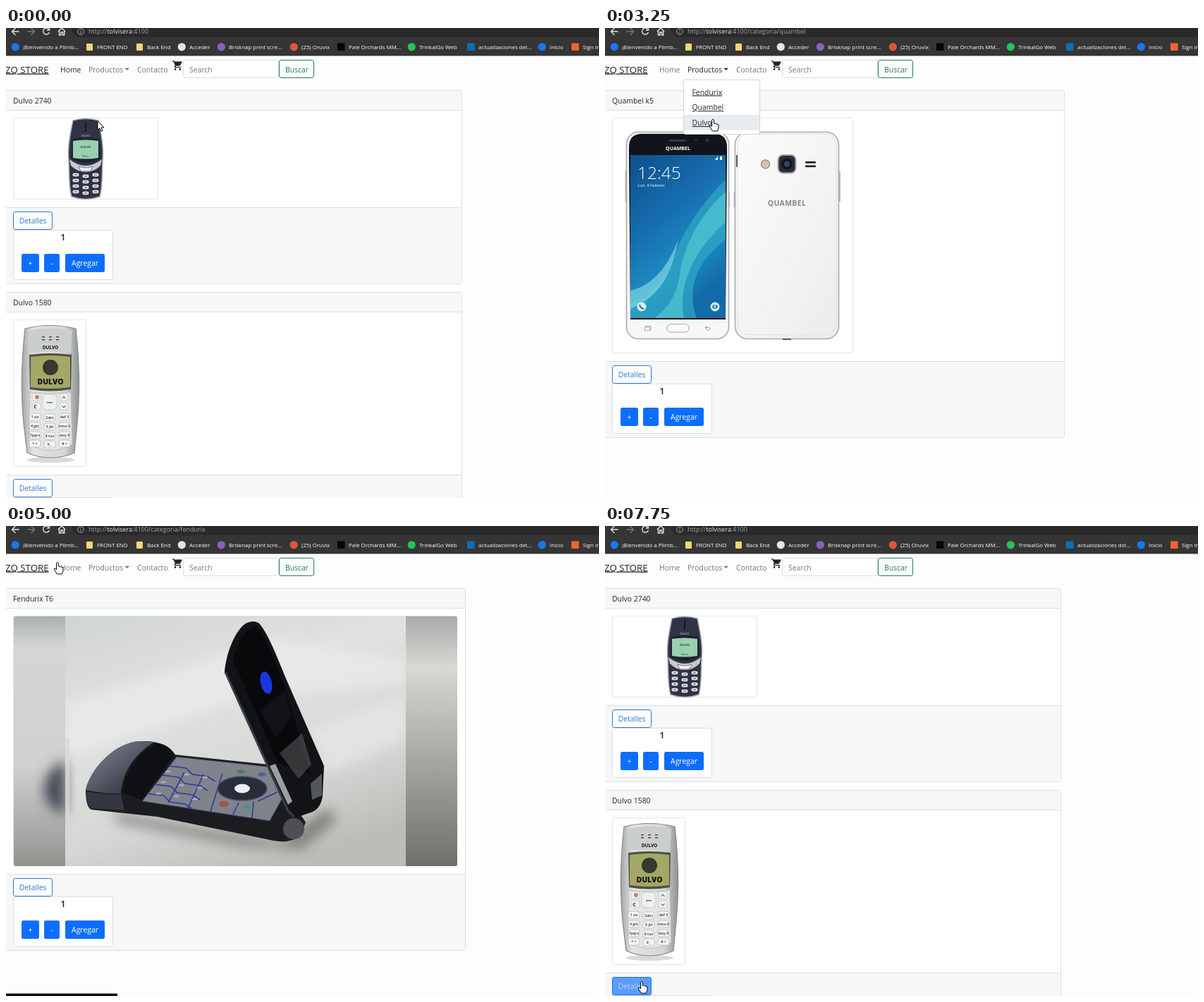
An HTML page that plays this animation: 841x666 px, repeating every 8000 ms.

```html
<!DOCTYPE html>
<html lang="es">
<head>
<meta charset="utf-8">
<title>Tienda</title>
<style>
  html, body { margin: 0; width: 100%; height: 100%; overflow: hidden; background: #fdfdfd; }
  svg { display: block; width: 841px; height: 666px; font-family: "Open Sans", "Noto Sans", sans-serif; }
  text { white-space: pre; }
</style>
</head>
<body>
<svg id="stage" viewBox="0 0 841 666">
  <defs>
    <linearGradient id="wallpaper" x1="0" y1="0" x2=".5" y2="1">
      <stop offset="0" stop-color="#0f4f8c"/><stop offset=".45" stop-color="#176fb0"/>
      <stop offset=".75" stop-color="#1d8dc0"/><stop offset="1" stop-color="#126aa8"/>
    </linearGradient>
    <linearGradient id="silver">
      <stop offset="0" stop-color="#a3a6a6"/><stop offset=".2" stop-color="#e2e4e3"/>
      <stop offset=".75" stop-color="#d5d7d6"/><stop offset="1" stop-color="#8f9292"/>
    </linearGradient>
    <linearGradient id="backCover" x1="0" y1="0" x2="1" y2="1">
      <stop offset="0" stop-color="#fcfcfc"/><stop offset="1" stop-color="#ececee"/>
    </linearGradient>
    <linearGradient id="table" x1="0" y1="0" x2=".6" y2="1">
      <stop offset="0" stop-color="#cdd2d0"/><stop offset=".4" stop-color="#e0e2e0"/>
      <stop offset=".75" stop-color="#d6d7d4"/><stop offset="1" stop-color="#bcbcb8"/>
    </linearGradient>
    <linearGradient id="leftBlur" x1="0" y1="0" x2="0" y2="1">
      <stop offset="0" stop-color="#a9afad"/><stop offset=".12" stop-color="#d3d6d4"/>
      <stop offset=".6" stop-color="#cfd1cf"/><stop offset="1" stop-color="#92938f"/>
    </linearGradient>
    <linearGradient id="rightBlur" x1="0" y1="0" x2="0" y2="1">
      <stop offset="0" stop-color="#a9aba8"/><stop offset=".2" stop-color="#d8d8d4"/>
      <stop offset=".55" stop-color="#aaaaa5"/><stop offset="1" stop-color="#6f6f6b"/>
    </linearGradient>
    <linearGradient id="chin" x1="0" y1="0" x2="1" y2="1">
      <stop offset="0" stop-color="#868a96"/><stop offset=".5" stop-color="#555966"/><stop offset="1" stop-color="#202129"/>
    </linearGradient>
    <filter id="blur" x="-50%" y="-50%" width="200%" height="200%"><feGaussianBlur stdDeviation="9"/></filter>
    <clipPath id="photo"><rect x="11" y="128" width="629" height="354" rx="3"/></clipPath>
    <clipPath id="screen"><rect x="36" y="180" width="135" height="231"/></clipPath>
  </defs>
</svg>
<script>
const INK = '#212529', GRAY = '#757575', BLUE = '#0d6efd', SOFT_BLUE = '#2f78d6', LINE = '#dcdee0';
const HOST = 'tolvisera';
const BRANDS = ['Fendurix', 'Quambel', 'Dulvo'];

const text = (x, y, str, fill = INK, size = 10.4, extra = '') =>
  `<text x="${x}" y="${y}" fill="${fill}" font-size="${size}" ${extra}>${str}</text>`;
const rect = (x, y, w, h, fill, extra = '') =>
  `<rect x="${x}" y="${y}" width="${w}" height="${h}" fill="${fill}" ${extra}/>`;
const frame = (x, y, w, h, fill, stroke) => rect(x, y, w, h, fill, `rx="2.7" stroke="${stroke}"`);
const path = (d, fill = 'none', extra = '') => `<path d="${d}" fill="${fill}" ${extra}/>`;
const oval = (x, y, rx, ry, fill, extra = '') =>
  `<ellipse cx="${x}" cy="${y}" rx="${rx}" ry="${ry}" fill="${fill}" ${extra}/>`;
const disc = (x, y, r, fill, extra) => oval(x, y, r, r, fill, extra);
const centered = 'text-anchor="middle"';
const group = (id, body) => `<g id="${id}">${body}</g>`;
const grid = (xs, ys, draw) => ys.map((y, r) => xs.map((x, c) => draw(x, y, r, c)).join('')).join('');

function button(x, y, w, label) {
  return rect(x, y, w, 26, BLUE, 'rx="2.7"') + text(x + w / 2, y + 16.7, label, '#fff', 10.4, centered);
}

function details(y, fill, stroke, color) {
  return frame(10.5, y, 55, 25, fill, stroke) + text(18.7, y + 16.8, 'Detalles', color);
}

function card(y, title, width, photoW, photoH, photo) {
  const foot = y + photoH + 51;
  return frame(-4.5, y, width + 5, photoH + 159, '#fff', LINE) +
    rect(-4, y + .5, width + 4, 28, '#f7f7f7') + rect(-4, foot, width + 4, 107.5, '#f7f7f7') +
    path(`M0 ${y + 28}H${width}M0 ${foot}H${width}`, 'none', `stroke="${LINE}"`) +
    text(10, y + 18.3, title) +
    frame(10.5, y + 39, photoW, photoH, '#fff', '#e1e4e7') + photo +
    details(foot + 6, '#fdfdfd', SOFT_BLUE, SOFT_BLUE) +
    frame(10.5, foot + 32, 141, 70, '#fff', LINE) +
    text(81, foot + 46, 1, INK, 13, centered + ' font-weight="600"') +
    button(22, foot + 65.5, 25, '+') + button(54, foot + 65.5, 22, '-') + button(84, foot + 65.5, 56, 'Agregar');
}

function darkPhone() {
  return path('M95 131Q113 126 131 131C135 150 139 170 137 188C136 208 137 226 133 239Q113 246 93 239C89 226 90 208 89 188C87 170 91 150 95 131Z',
      '#303344', 'stroke="#a9abb5" stroke-width="1.5"') +
    path('M113 133V147', 'none', 'stroke="#171923" stroke-width="2"') +
    text(113, 154, 'DULVO', '#d5d7df', 3.8, centered) +
    path('M94 157Q113 153 132 157L134 185Q113 197 92 185Z', '#1f2230') +
    path('M95 160Q113 157 131 160V184Q113 187 95 184Z', '#98d0b0') +
    text(113, 170, 'DULVO', '#294b3b', 4.2, centered + ' font-weight="700"') +
    text(113, 183, 'Menu', '#294b3b', 3.6, centered) +
    path('M90 186Q113 204 136 186L134 195Q125 204 113 204Q101 204 92 195Z', '#c6c9d0') +
    path('M103 196Q113 200 123 196L120 203H106Z', '#f0f1f4', 'stroke="#555867" stroke-width=".7"') +
    grid([99, 113, 127], [208, 216, 224, 232], (x, y, r, c) => {
      const ky = y + (c === 1 ? 2 : 0);
      return oval(x, ky, 5, 2.9, '#dfe1e7', 'stroke="#111420" stroke-width=".6"') + rect(x - 2, ky - .6, 4, 1.2, '#666a78');
    });
}

function silverPhone() {
  const keys = ['1 oo', '2abc', 'def 3', '4 ghi', '5 jkl', 'mno 6', '7pqrs', '8 tuv', 'wxy 9', '* +', '0 _', '# ^'];
  return oval(63, 612, 34, 4, '#d8d9d8') +
    path('M27 426Q63 417 99 426C104 470 105 520 101 560L97 602Q63 616 30 602L25 560C21 520 22 470 27 426Z',
      'url(#silver)', 'stroke="#858988" stroke-width="1.2"') +
    path('M32 429Q63 422 94 429L92 461Q63 456 34 461Z', '#cbcecf') +
    grid([53, 63, 73], [437, 441], (x, y) => rect(x - 2, y, 4, 1.4, '#444')) +
    text(63, 455, 'DULVO', '#111', 6.5, centered + ' font-weight="700"') +
    path('M33 463Q63 459 93 463L92 512Q63 517 34 512Z', '#4f523f') +
    path('M35 466Q63 462 91 466V509Q63 513 35 509Z', '#a3a768') +
    disc(63, 481, 11, '#36392b') +
    text(63, 505, 'DULVO', '#15170e', 10.5, centered + ' font-weight="800"') +
    path('M34 516Q63 520 92 516L94 590Q63 607 32 590Z', '#e4e6e4', 'stroke="#aeb1af" stroke-width=".7"') +
    grid([43, 82], [523, 536], (x, y) => rect(x - 6, y - 5, 12, 10, '#f2f3f1', 'rx="3" stroke="#b5b8b6" stroke-width=".6"')) +
    disc(44, 523, 3, '#c4846a') + text(41.5, 539, 'C', '#222', 7, centered + ' font-weight="700"') +
    path('M79.5 525L82 522L84.5 525M79.5 535L82 538L84.5 535', 'none', 'stroke="#333"') +
    rect(52, 519, 20, 22, '#eff0ee', 'rx="6" stroke="#b9bcba" stroke-width=".7"') +
    rect(58, 530, 8, 1.6, '#557fb0') +
    grid([41, 62, 83], [551, 564, 577, 589], (x, y, r, c) => {
      const ky = y + (c === 1 ? 1 : 0);
      return rect(x - 8, ky - 5, 16, 10, '#f4f5f3', 'rx="3" stroke="#b2b5b3" stroke-width=".7"') +
        text(x, ky + 2.3, keys[r * 3 + c], '#333', 5.3, centered + ' font-weight="600"');
    });
}

function whitePhone() {
  const edge = 'stroke="#a7a9ae" stroke-width="1.6"';
  return rect(28.5, 202, 3, 45, '#b9bcc0') + rect(174, 232, 3, 22, '#b9bcc0') + rect(182.5, 232, 3, 22, '#b9bcc0') + rect(331, 203, 3, 43, '#b9bcc0') +
    rect(30.5, 147.5, 145, 293, '#f7f7f8', `rx="17" ${edge}`) +
    path('M34 181V169Q34 150 52 150H155Q173 150 173 169V181L171 413H36Z', '#11151b') +
    rect(36, 180, 135, 231, 'url(#wallpaper)') +
    `<g clip-path="url(#screen)">` +
    path('M171 215C135 250 110 290 95 330C80 365 60 385 36 390V411H130C115 370 130 330 171 300Z', '#2fa9c6', 'opacity=".7"') +
    path('M171 232C130 270 112 310 106 350C100 385 85 400 70 411H112C104 370 120 320 171 275Z', '#62d2d8', 'opacity=".55"') +
    path('M36 372C70 365 90 335 104 300C95 345 80 380 36 398Z', '#8fe3e6', 'opacity=".6"') + '</g>' +
    rect(90, 158, 25, 3, '#343a42', 'rx="1.5"') + disc(145, 159, 2.5, '#2b3440') + disc(129, 159, 1.5, '#303842') +
    text(103.5, 173, 'QUAMBEL', '#fff', 7, centered + ' font-weight="700"') +
    path('M156 187L160 182V187Z', '#fff') + rect(163, 182, 3, 5, '#fff') +
    text(46, 214, '12:45', '#fff', 24.5, 'font-weight="300"') + text(47, 225, 'Lun. 8 Febrero', '#fff', 5.6) +
    disc(52, 395, 6.5, '#d7f0f4') + path('M49 392Q50 397 55 398', 'none', 'stroke="#28779a" stroke-width="2"') +
    disc(156, 395, 6.5, '#d7f0f4') + rect(152.5, 392.5, 7, 5, '#28779a', 'rx="1"') + disc(156, 395, 1.4, '#d7f0f4') +
    rect(88, 419.5, 31, 11.5, '#fafafa', 'rx="5.5" stroke="#a3a5a8"') +
    rect(58, 422.5, 7, 5, 'none', 'stroke="#999" stroke-width=".8"') + rect(56.5, 424, 7, 5, '#f7f7f8', 'stroke="#999" stroke-width=".8"') +
    path('M145 422.5L142 424.5L145 426.5M142 424.5H148Q151 426 148 428H144', 'none', 'stroke="#999" stroke-width=".9"') +
    rect(184.5, 147.5, 147, 293, 'url(#backCover)', `rx="18" ${edge}`) +
    rect(188, 150.5, 140, 284, 'none', 'rx="15" stroke="#e0e1e3"') +
    path('M187 180V197M252 441H264', 'none', 'stroke="#565a60" stroke-width="2"') +
    disc(227.5, 193, 6, '#d7c59d', 'stroke="#939498" stroke-width="1.5"') +
    rect(245.5, 180, 25, 25.5, '#282d36', 'rx="7" stroke="#a4a7ac" stroke-width="2"') +
    disc(258, 192.7, 8, '#11161f') + disc(258, 192.7, 4, '#34466a') +
    rect(284, 189, 15, 2.8, '#22252a', 'rx="1"') + rect(284, 194.5, 15, 2.8, '#22252a', 'rx="1"') +
    text(258, 251.5, 'QUAMBEL', '#85888c', 10.4, centered + ' font-weight="700" letter-spacing=".4"');
}

function flipPhone() {
  const keyLine = y => `M${242 - (y - 327) * .82} ${y}l24 3l9 9l22 3l10 7`;
  return `<g clip-path="url(#photo)">` + rect(11, 128, 629, 355, 'url(#table)') +
    path('M84 250L380 160L567 190V225L330 245L84 330Z', '#f0f2f0', 'opacity=".5" filter="url(#blur)"') +
    path('M430 290L567 240V300L455 350Z', '#eff0ec', 'opacity=".5" filter="url(#blur)"') +
    path('M150 405L390 448L455 400L470 415L420 458L330 452L160 420Z', '#64645f', 'opacity=".7" filter="url(#blur)"') +
    rect(11, 128, 73, 355, 'url(#leftBlur)') + rect(567, 128, 74, 355, 'url(#rightBlur)') +
    path('M84 332Q55 345 54 375Q55 400 84 408Z', '#454957', 'filter="url(#blur)"') +
    path('M84 300H116V415H84Z', '#d9dbd9', 'opacity=".8"').replace('H116', 'H90').replace('V415H84', 'V415H84') +
    path('M113 374C120 345 150 312 182 306Q225 301 240 324L372 338L425 420L416 440Q402 450 380 446L215 412L122 402Q113 400 113 374Z', '#1b1c20') +
    path('M113 374C120 345 150 312 185 305L210 306C180 325 165 350 163 379Q140 380 113 374Z', 'url(#chin)') +
    path('M114 376Q140 381 163 380L168 403L122 400Q114 398 114 376Z', '#343640') +
    path('M164 378C169 345 190 318 215 308Q230 309 239 324L193 388Z', '#101115') +
    path('M242 327L372 341L392 386L374 418L193 390Z', '#7f838c', 'stroke="#35384a"') +
    path([340, 353, 366, 379].map(keyLine).join('') + 'M253 349L230 392M280 352L258 400M307 350L290 405M330 392L321 411M351 390L349 414M385 377L357 390', 'none', 'stroke="#34389a" stroke-width="1.6"') +
    grid([230, 252, 274], [348, 363, 379], (x, y, r, c) => oval(x - r * 7 + c * 4, y + c * 4, 4, 1.6, '#a9acb5')) +
    oval(335, 372, 35, 17, '#292c39', 'stroke="#4d5169" stroke-width="1.5"') + oval(335, 372, 11, 6.5, '#eceef2') +
    oval(333, 348, 6, 3, '#4f7d62') + oval(363, 352, 6, 3, '#4a64a0') + oval(309, 394, 7, 4, '#a3524f') + oval(342, 398, 6, 3, '#4f8f8b') +
    path('M310 207C312 180 325 148 340 138Q352 132 360 139C374 157 385 187 397 216L451 340L449 382Q447 399 435 405L409 414L374 347Z', '#111317') +
    path('M311 207L400 404L409 412', 'none', 'stroke="#3b3f47" stroke-width="3"') +
    path('M322 190L386 336L432 351L394 224C377 180 364 148 353 142Q332 150 322 190Z', '#08090b') +
    path('M361 262L396 233L405 270L382 301Z', '#121316') +
    path('M388 322L420 294L433 338L415 358Z', '#777b7c', 'opacity=".4"') +
    path('M374 340L382 337L406 390L400 395Z', '#9b9fa3') +
    path('M432 365L448 351V382L434 388Z', '#54575a') +
    oval(369, 222, 8, 16, '#1739dc', 'transform="rotate(-13 369 222)"') +
    disc(408, 429, 15, '#4d4f52') + '</g>';
}

function bookmarks() {
  const items = [
    [24, '¡Bienvenido a Plimb...', '#1877f2'], [129, 'FRONT END', ''], [200, 'Back End', ''],
    [260, 'Acceder', '#dce8f2'], [316, 'Brisknap print scre...', '#8862bd'], [419, '(25) Oruvix', '#df5540'],
    [486, 'Pale Orchards MM...', '#050505', 1], [586, 'TrinkalGo Web', '#25c45a'],
    [670, 'actualizaciones del...', '#0a70b8', 1], [771, 'Inicio', '#1877f2'], [818, 'Sign in', '#f2652b', 1]];
  return items.map(([x, label, color, square]) =>
    (!color ? rect(x - 15, 22, 9, 10, '#f4d675', 'rx="1"')
      : square ? rect(x - 16, 21.5, 10.5, 10.5, color) : disc(x - 10.7, 26.8, 5.6, color)) +
    text(x, 29.6, label, '#fff', 7.9)).join('');
}

function chrome() {
  const stroke = color => `stroke="${color}" stroke-width="1.4"`;
  return rect(0, 0, 841, 39.5, '#353535') + rect(93, -14, 760, 27, '#2a2a2a', 'rx="13"') +
    path('M18.5 5H9M13.5 0L8.5 5L13.5 10', 'none', stroke('#e2e2e2')) +
    path('M30.5 5H40M35.5 0L40.5 5L35.5 10', 'none', stroke('#777')) +
    path('M60.5 1.5A4.5 4.5 0 1 0 61.5 6M61.5 0V3H58', 'none', stroke('#e2e2e2')) +
    path('M74 5L79 0L84 5M75.5 4V10H78V6H80.5V10H82.7V4', 'none', stroke('#e2e2e2')) +
    disc(106, 5, 4.3, 'none', 'stroke="#a8a8a8"') + rect(105.5, 4.5, 1, 3, '#aaa') + rect(105.5, 2.5, 1, 1, '#aaa') +
    `<text x="117" y="8.2" font-size="9" fill="#a2a2a2">http://<tspan fill="#e6e6e6">${HOST}</tspan>:4100<tspan id="route"></tspan></text>` +
    bookmarks();
}

function navbar() {
  const cart = 'M7 18a2 2 0 1 0 0 4 2 2 0 0 0 0-4zM1 2v2h2l3.6 7.6-1.35 2.4C4.5 15.4 5.5 17 7 17h12v-2H7.4l1-2h7.2c.75 0 1.4-.4 1.75-1L21 5.5A1 1 0 0 0 20 4H5.2l-.94-2zM17 18a2 2 0 1 0 0 4 2 2 0 0 0 0-4z';
  return text(-1, 63.5, 'ZQ STORE', INK, 13.3, 'text-decoration="underline"') +
    text(77, 62.7, 'Home', GRAY, 10.4, 'id="home"') +
    group('products', text(117, 62.7, 'Productos', 'currentColor') + path('M168.5 56.7h6.5l-3.25 3.3z', 'currentColor')) +
    text(186, 62.7, 'Contacto', GRAY) +
    path(cart, INK, 'transform="translate(235.3 44.8) scale(.68)"') +
    frame(251.5, 45.5, 135, 25, '#fff', '#dadfe3') + text(260, 62.5, 'Search', '#747b82') +
    frame(387.5, 45.5, 49, 25, '#fdfdfd', '#27795a') + text(396, 62.5, 'Buscar', '#27795a');
}

function menu() {
  return frame(111.5, 73.5, 108, 77, '#fff', '#d4d5d6') + rect(112, 0, 107, 22, '#e9ecef', 'id="hover"') +
    BRANDS.map((name, i) => text(123.5, 94.5 + i * 21.8, name, INK, 10.4, 'text-decoration="underline"')).join('');
}

const classics = card(88.5, 'Dulvo 2740', 646, 205, 115, darkPhone()) + card(374.5, 'Dulvo 1580', 646, 103, 208, silverPhone());
const outline = 'stroke="#000" stroke-width="1" stroke-linejoin="round"';

const stage = document.getElementById('stage');
stage.innerHTML += rect(0, 0, 841, 666, '#fdfdfd') +
  group('classics', classics) +
  group('quambel', card(88.5, 'Quambel k5', 651, 341, 333, whitePhone())) +
  group('fendurix', card(88.5, 'Fendurix T6', 651, 629, 354, flipPhone())) +
  group('filled', details(639.5, BLUE, BLUE, '#fff')) +
  chrome() + navbar() + group('menu', menu()) + rect(0, 662.5, 0, 4, '#0c0c0c', 'id="status"') +
  group('pointer',
    path('M0 0V12.5L3 9.8L5 14.2L7 13.3L5.1 9H9Z', '#fff', `id="arrow" ${outline}`) +
    path('M-1.4 1.4Q0-1 1.4 1.4V6L4.5 6.6L8 8V12.5L6.5 17H-.5L-4.5 11Q-5.3 8.8-3.2 9.2L-1.4 10.6Z', '#fff', `id="hand" ${outline}`));

const el = Object.fromEntries([...stage.querySelectorAll('[id]')].map(node => [node.id, node]));
const show = (node, on) => node.setAttribute('display', on ? 'inline' : 'none');

// Step, pointer x, y, shape, route, menu item (-1: open, none hovered; null: closed), status bar width.
// The pointer glides between rows; everything else holds until the next row.
const STEP = 250, STEPS = 32, REACH_DETAILS = 29;
const script = [
  [0, 130, 132, 'arrow', '', null, 0],
  [3, 150, 58, 'hand', '', null, 0],
  [4, 151, 60, 'hand', '', -1, 0],
  [6, 156, 84, 'hand', '', 0, 0],
  [7, 156, 95, 'hand', '', 0, 102],
  [8, 156, 109, 'hand', '', 1, 158],
  [9, 156, 109, 'arrow', 'quambel', null, 158],
  [11, 152, 58, 'hand', 'quambel', null, 0],
  [12, 152, 68, 'hand', 'quambel', -1, 0],
  [13, 153, 129, 'hand', 'quambel', 2, 0],
  [14, 153, 129, 'arrow', 'dulvo', null, 158],
  [16, 152, 58, 'hand', 'dulvo', null, 0],
  [17, 152, 68, 'hand', 'dulvo', -1, 0],
  [18, 153, 89, 'hand', 'dulvo', 0, 158],
  [19, 153, 89, 'hand', 'dulvo', 0, 158],
  [20, 73, 51, 'hand', 'fendurix', null, 158],
  [21, 46, 54, 'hand', 'fendurix', null, 66],
  [22, 42, 55, 'hand', '', null, 66],
  [24, 62, 91, 'arrow', '', null, 0],
  [REACH_DETAILS, 53, 643, 'hand', '', null, 0],
  [31, 52, 645, 'hand', '', null, 0]];

function render(now) {
  const step = Math.floor(now / STEP) % STEPS;
  const i = script.findLastIndex(row => row[0] <= step);
  const [start, x, y, shape, route, item, status] = script[i];
  const [end, nextX, nextY] = script[i + 1] || [STEPS, x, y];
  const k = (step - start) / (end - start);
  const open = item !== null;

  el.pointer.setAttribute('transform', `translate(${x + (nextX - x) * k} ${y + (nextY - y) * k})`);
  show(el.arrow, shape === 'arrow');
  show(el.hand, shape === 'hand');
  show(el.classics, route === '' || route === 'dulvo');
  show(el.quambel, route === 'quambel');
  show(el.fendurix, route === 'fendurix');
  show(el.menu, open);
  show(el.hover, open && item >= 0);
  el.hover.setAttribute('y', 79.3 + 21.8 * Math.max(item, 0));
  show(el.filled, step >= REACH_DETAILS);
  el.filled.setAttribute('opacity', step === STEPS - 1 ? .67 : 1);
  el.status.setAttribute('width', status);
  el.route.textContent = route && '/categoria/' + route;
  el.home.setAttribute('fill', step < 9 ? INK : GRAY);
  el.products.setAttribute('color', open ? INK : GRAY);
  requestAnimationFrame(render);
}
requestAnimationFrame(render);
</script>
</body>
</html>
```
